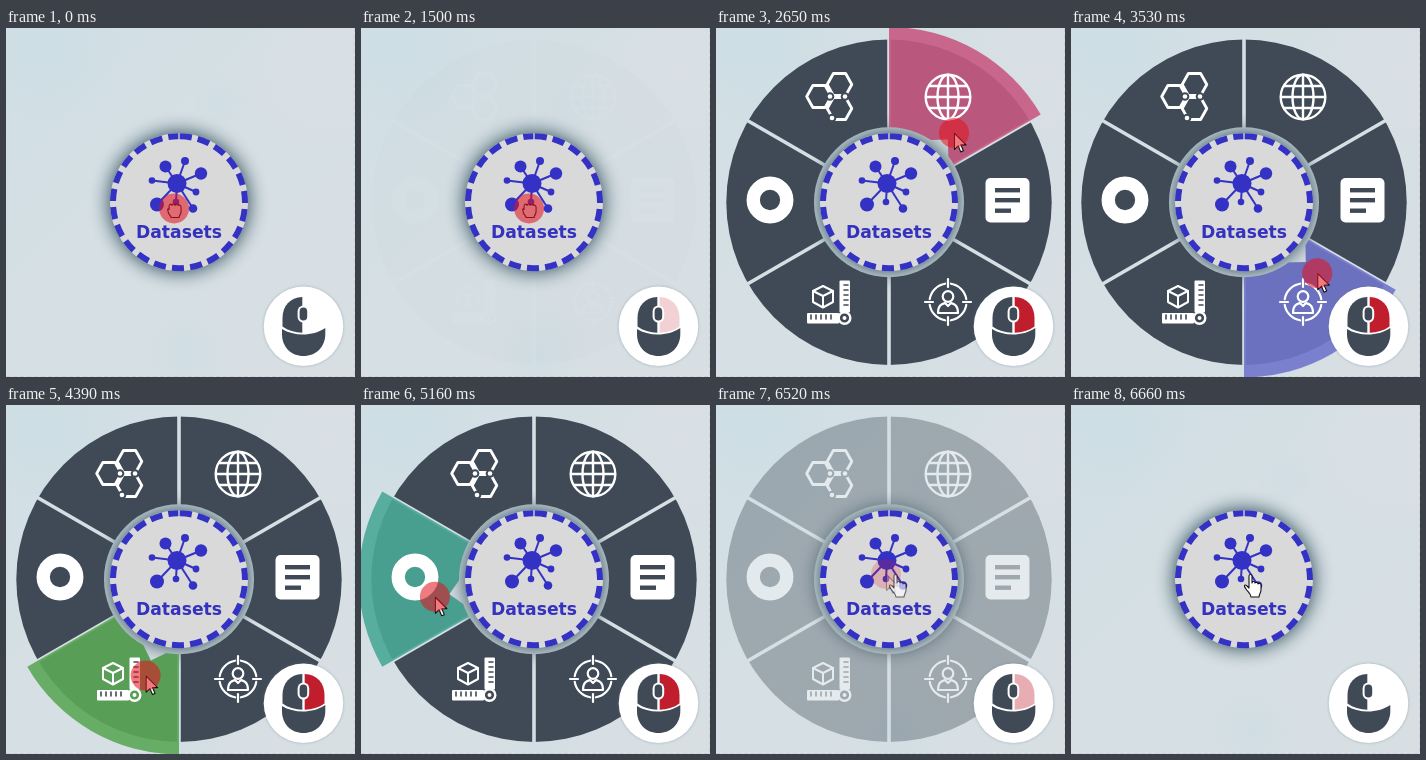
Recreate the animation shown at these times as an HTML page with a canvas. Size 349x349 px, loop 8160 ms.

```html
<!DOCTYPE html>
<html lang="en">
<head>
<meta charset="utf-8">
<title>Radial menu</title>
<style>
html, body { margin: 0; width: 100%; height: 100%; overflow: hidden; background: #d5dfe4; }
canvas { position: absolute; left: 0; top: 0; width: 349px; height: 349px; }
#label {
  position: absolute; left: 73px; top: 194px; width: 200px; text-align: center;
  font: bold 17.2px/20px "DejaVu Sans", sans-serif; color: #3432be;
}
</style>
</head>
<body>
<canvas id="stage"></canvas>
<div id="label">Datasets</div>
<script>
const SIZE = 349, LOOP = 8160, TAU = Math.PI * 2, RAD = Math.PI / 180;
const CX = 173, CY = 174.2, OUTER = 162.7, INNER = 75, GROW = 12.5;
const DARK = '#3f4a56', BLUE = '#3432c4', RED = '#c01e2d';
const dpr = window.devicePixelRatio || 1;

function setup(canvas) {
  canvas.width = canvas.height = Math.round(SIZE * dpr);
  const c = canvas.getContext('2d');
  c.scale(dpr, dpr);
  return c;
}
const g = setup(document.getElementById('stage'));
const layer = document.createElement('canvas');
const m = setup(layer);

// clockwise from the right-hand sector
const SECTOR = ['176,95,190', '113,118,203', '93,168,87', '74,168,150', '174,152,60', '199,90,129'];

// pointer path: time, angle, distance from the centre
const PATH = [
  [2030, -52, -8], [2300, -50, 40], [2520, -48, 88], [2650, -47, 95], [2820, -22, 98],
  [2920, -22, 98], [3530, 44, 102], [3700, 58, 102], [3800, 58, 102], [4390, 109, 102],
  [4610, 128, 100], [4630, 128, 100], [5440, 192, 101], [5460, 192, 101],
  [6020, 236.5, 102], [6100, 238, 90], [6260, 240, 6]
];

// spokes of the hub icon: x, y, radius
const SPOKES = [
  [159.5, 138.5, 6], [179, 133, 4], [195, 145.5, 6.2], [190, 164, 3.4],
  [187, 180.5, 4.3], [170, 174, 3.3], [151, 176.5, 7], [146, 152.5, 3.3]
];

const clamp = v => Math.max(0, Math.min(1, v));
const ramp = (t, a, b) => clamp((t - a) / (b - a));

function track(t) {
  let i = 1;
  while (i < PATH.length - 1 && t > PATH[i][0]) i++;
  const a = PATH[i - 1], b = PATH[i], k = ramp(t, a[0], b[0]);
  return [a[1] + (b[1] - a[1]) * k, a[2] + (b[2] - a[2]) * k];
}

function disc(c, x, y, r, fill) {
  c.beginPath();
  c.arc(x, y, r, 0, TAU);
  c.fillStyle = fill;
  c.fill();
}

function ring(c, x, y, r) {
  c.beginPath();
  c.arc(x, y, r, 0, TAU);
  c.stroke();
}

function line(c, ...p) {
  c.beginPath();
  for (let i = 0; i < p.length; i += 2) c.lineTo(p[i], p[i + 1]);
  c.stroke();
}

function box(c, x, y, w, h, r, fill) {
  c.beginPath();
  c.roundRect(x, y, w, h, r);
  c.fillStyle = fill;
  c.fill();
}

function blob(x, y, r, rgb, a) {
  const s = g.createRadialGradient(x, y, 0, x, y, r);
  s.addColorStop(0, `rgba(${rgb},${a})`);
  s.addColorStop(1, `rgba(${rgb},0)`);
  g.fillStyle = s;
  g.fillRect(x - r, y - r, 2 * r, 2 * r);
}

function backdrop() {
  const s = g.createLinearGradient(0, 0, SIZE, SIZE);
  s.addColorStop(0, '#d0dfe4');
  s.addColorStop(0.5, '#d6dfe4');
  s.addColorStop(1, '#d7dfe3');
  g.fillStyle = s;
  g.fillRect(0, 0, SIZE, SIZE);
  blob(40, 20, 80, '200,221,229', 0.5);
  blob(215, 75, 30, '205,221,227', 0.6);
  blob(180, 325, 50, '202,221,228', 0.5);
  blob(320, 40, 90, '219,224,229', 0.6);
  g.strokeStyle = 'rgba(170,190,190,.35)';
  g.lineWidth = 1;
  g.setLineDash([4, 3]);
  line(g, 0, 348.5, SIZE, 348.5);
  line(g, 348.5, 0, 348.5, SIZE);
  g.setLineDash([]);
}

function node() {
  g.save();
  g.shadowColor = 'rgba(18,52,64,.95)';
  g.shadowBlur = 20 * dpr;
  disc(g, CX, CY, 69, '#d9d9d9');
  g.restore();
  g.strokeStyle = BLUE;
  g.lineWidth = 6;
  g.setLineDash([12.2, 6.1]);
  g.beginPath();
  g.arc(CX, CY, 66, -TAU / 4 + 0.01, TAU * 0.75 - 0.01);
  g.stroke();
  g.setLineDash([]);
  g.lineWidth = 2;
  for (const [x, y, r] of SPOKES) {
    line(g, 171, 155.5, x, y);
    disc(g, x, y, r, BLUE);
  }
  disc(g, 171, 155.5, 9.5, BLUE);
}

function globe(x, y) {
  m.lineWidth = 2.4;
  ring(m, x, y, 22.3);
  m.beginPath();
  m.ellipse(x, y, 10.5, 22.3, 0, 0, TAU);
  m.stroke();
  line(m, x, y - 22, x, y + 22);
  line(m, x - 22, y, x + 22, y);
  line(m, x - 19, y - 11, x + 19, y - 11);
  line(m, x - 19, y + 11, x + 19, y + 11);
}

function hexes() {
  m.lineWidth = 2.8;
  for (const [x, y] of [[123.5, 56.5], [103, 68.5], [123.5, 80.5]]) {
    m.beginPath();
    for (let i = 0; i < 6; i++) m.lineTo(x + 12.3 * Math.cos(i * TAU / 6), y + 11.8 * Math.sin(i * TAU / 6) / 0.93);
    m.closePath();
    m.stroke();
  }
  for (const [x, y] of [[129, 68.5], [114, 68.5], [116, 90]]) {
    disc(m, x, y, 4.3, DARK);
    disc(m, x, y, 2.3, '#fff');
  }
}

function person(x, y) {
  m.lineWidth = 2.2;
  for (let i = 0; i < 4; i++) {
    m.beginPath();
    m.arc(x, y, 18.5, (i * 90 + 9) * RAD, (i * 90 + 81) * RAD);
    m.stroke();
    const c = Math.round(Math.cos(i * TAU / 4)), s = Math.round(Math.sin(i * TAU / 4));
    line(m, x + c * 15, y + s * 15, x + c * 23, y + s * 23);
  }
  ring(m, x, y - 5.5, 5.3);
  m.beginPath();
  m.moveTo(x - 10, y + 11);
  m.bezierCurveTo(x - 10, y + 3, x - 6, y + 2, x - 3, y + 1);
  m.lineTo(x, y + 4);
  m.lineTo(x + 3, y + 1);
  m.bezierCurveTo(x + 6, y + 2, x + 10, y + 3, x + 10, y + 11);
  m.closePath();
  m.stroke();
}

function measure() {
  m.lineWidth = 2;
  line(m, 107, 258, 117, 263, 117, 274, 107, 279.5, 97, 274, 97, 263, 107, 258, 117, 263);
  line(m, 97, 263, 107, 268, 117, 263);
  line(m, 107, 268, 107, 279);
  box(m, 123.5, 252.5, 10.5, 32, 1, '#fff');
  box(m, 91, 285, 32, 10.5, 1, '#fff');
  m.strokeStyle = DARK;
  m.lineWidth = 1.6;
  for (let i = 0; i < 5; i++) {
    line(m, 128, 257 + i * 5, 132, 257 + i * 5);
    line(m, 95 + i * 5, 287, 95 + i * 5, 291);
  }
  m.strokeStyle = '#fff';
  m.lineWidth = 2.4;
  ring(m, 128.5, 290, 5.8);
  disc(m, 128.5, 290, 2, '#fff');
}

function icons() {
  m.strokeStyle = '#fff';
  m.lineJoin = m.lineCap = 'round';
  globe(232, 69);
  hexes();
  person(232, 274);
  measure();
  m.lineWidth = 13.3;
  ring(m, 54, 172, 16.8);
  box(m, 269.5, 150, 44, 44.5, 5, '#fff');
  box(m, 279, 160, 25, 4.4, 0, DARK);
  box(m, 279, 170, 25, 4.4, 0, DARK);
  box(m, 279, 180.5, 16, 4.4, 0, DARK);
}

function menu(angle, dist, alpha) {
  m.clearRect(0, 0, SIZE, SIZE);
  disc(m, CX, CY, OUTER, DARK);
  m.globalCompositeOperation = 'destination-out';
  m.strokeStyle = '#000';
  m.lineWidth = 3.6;
  m.lineCap = 'butt';
  for (let i = 0; i < 3; i++) {
    const a = (30 + i * 60) * RAD, x = 170 * Math.cos(a), y = 170 * Math.sin(a);
    line(m, CX - x, CY - y, CX + x, CY + y);
  }
  m.globalCompositeOperation = 'source-over';
  const active = dist >= INNER;
  if (active) {
    const i = Math.floor((((angle + 30) % 360) + 360) % 360 / 60);
    m.beginPath();
    m.moveTo(CX, CY);
    m.arc(CX, CY, OUTER + GROW, (i * 60 - 30) * RAD, (i * 60 + 30) * RAD);
    m.closePath();
    m.fillStyle = `rgba(${SECTOR[i]},.9)`;
    m.fill();
  }
  m.globalCompositeOperation = 'destination-out';
  disc(m, CX, CY, INNER, '#000');
  if (active) {
    m.save();
    m.translate(CX, CY);
    m.rotate(angle * RAD);
    m.translate(INNER - 6, 0);
    m.rotate(TAU / 8);
    m.fillRect(-12, -12, 24, 24);
    m.restore();
  }
  m.globalCompositeOperation = 'source-over';
  icons();
  g.globalAlpha = alpha;
  g.drawImage(layer, 0, 0, SIZE, SIZE);
  g.globalAlpha = 1;
}

function shape(d, x, y, alpha, fill, stroke) {
  if (alpha <= 0) return;
  const p = new Path2D(d);
  g.save();
  g.globalAlpha = alpha;
  g.translate(x, y);
  g.lineJoin = 'round';
  g.lineWidth = 1.1;
  g.fillStyle = fill;
  g.strokeStyle = stroke;
  g.fill(p);
  g.stroke(p);
  g.restore();
}

const ARROW = 'M.5 .5V16.5L4.2 13L6.8 19L9.4 17.9L6.9 12H12Z';
const HAND = 'M0 1C0-1 3-1 3 1V8C3 6 6 6 6 8C6 7 9 7 9 9C9 8 12 8 12 10V15C12 18 10 19 10 22H2C2 19-1 17-3 14C-6 10-4 9-2 11L0 13Z';
const FIST = 'M-5-3C-5-6-2-6-2-4C-2-6 1-6 1-4C1-6 4-6 4-4C4-5 7-5 7-2V2C7 5 5 6 5 8H-3C-3 6-6 5-6 2C-7-1-6-1-5 0Z';

function badge(alpha) {
  g.save();
  g.shadowColor = 'rgba(90,110,120,.45)';
  g.shadowBlur = 3 * dpr;
  disc(g, 297.5, 298.3, 39.8, '#fff');
  g.restore();
  const draw = (d, fill) => { g.fillStyle = fill; g.fill(new Path2D(d)); };
  draw('M296.3 269C284 269.5 276.5 278 276.5 290V298.5C282 302.5 289 304.5 296.3 304.8Z', DARK);
  g.globalAlpha = alpha;
  draw('M298.7 269C311 269.5 318.5 278 318.5 290V298.5C313 302.5 306 304.5 298.7 304.8Z', RED);
  g.globalAlpha = 1;
  draw('M276 301C288 308.5 307 308.5 319.3 300V306C319.3 319 310 328 297.6 328C285 328 276 319 276 306Z', DARK);
  box(g, 291.6, 277.6, 11.6, 17, 5.8, '#fff');
  box(g, 293.6, 279.6, 7.6, 13, 3.8, DARK);
}

function frame(now) {
  const t = now % LOOP;
  const open = ramp(t, 1500, 1790), shut = ramp(t, 6280, 6660);
  const show = open * (1 - shut);
  const [angle, dist] = track(t);
  const x = CX + dist * Math.cos(angle * RAD), y = CY + dist * Math.sin(angle * RAD);

  g.clearRect(0, 0, SIZE, SIZE);
  backdrop();
  node();
  if (show > 0) menu(angle, dist, show);
  shape(FIST, x, y + 1, 1 - open, 'rgba(255,255,255,.15)', '#111');
  shape(ARROW, x, y, show, '#fff', '#111');
  if (shut < 1) disc(g, x, y, 15, `rgba(228,18,30,${0.56 * (1 - shut)})`);
  shape(HAND, 178, 170, shut, '#fff', '#111');
  badge(t < 1500 ? 0 : (0.2 + 0.8 * open) * (1 - shut));
}

const start = performance.now();
function tick() {
  frame(performance.now() - start);
  requestAnimationFrame(tick);
}
tick();
</script>
</body>
</html>
```
